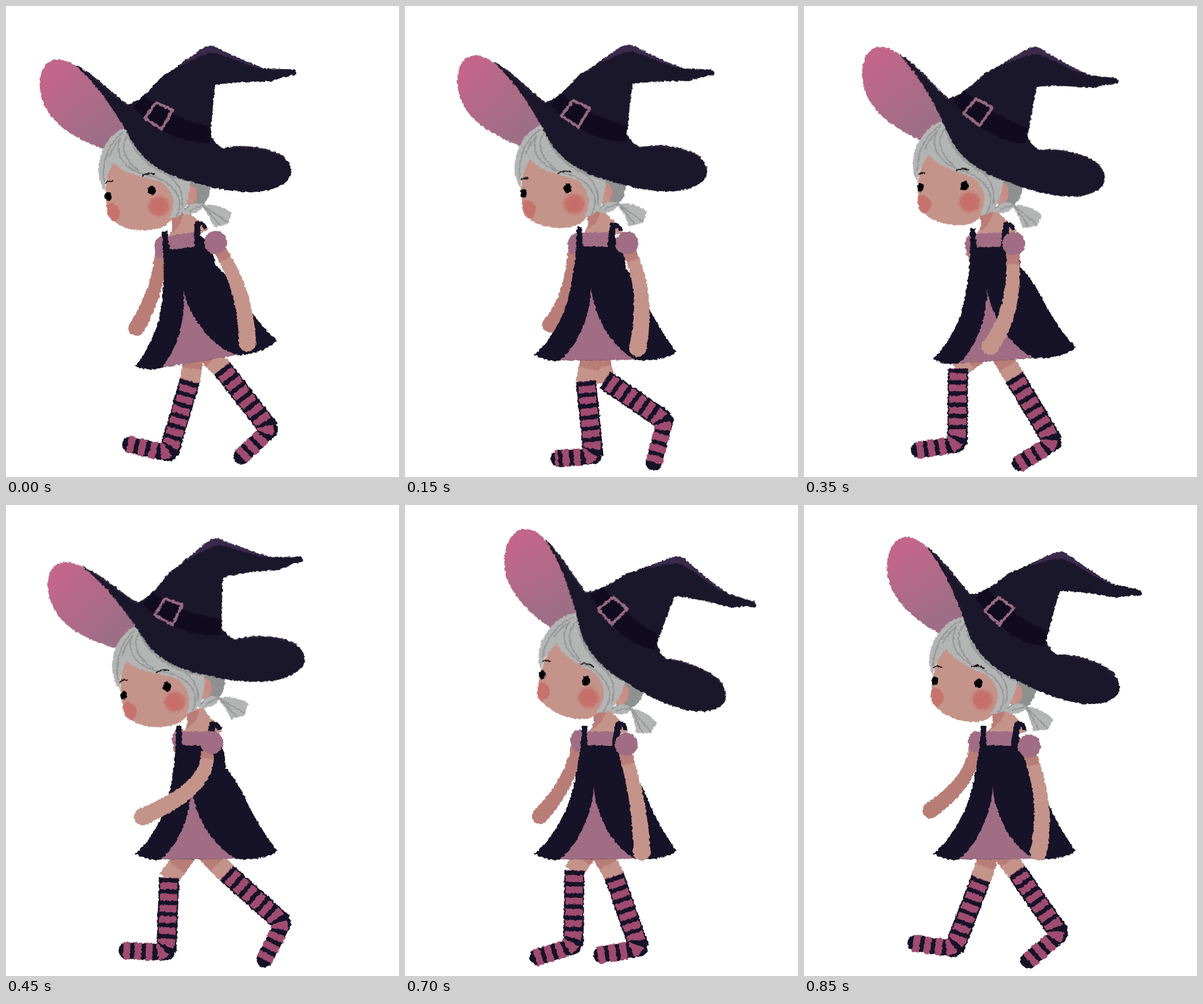
An HTML page that plays this animation: 684x819 px, repeating every 900 ms.

```html
<!DOCTYPE html>
<html lang="en">
<head>
<meta charset="utf-8">
<title>Walking witch</title>
<style>
  html, body { margin: 0; width: 100%; height: 100%; overflow: hidden; background: #fff; }
  svg { display: block; width: 100vw; height: 100vh; }
  .dark { fill: #161227; }
  .hat { fill: #1b172a; }
  .plum { fill: #a06d85; }
  .skin { fill: #c4948b; }
  .shade { fill: #b97d77; }
  .hair { fill: #b3b4b4; }
  .line { fill: none; stroke: #979797; stroke-width: 2.6; stroke-linecap: round; }
  .strap { fill: none; stroke: #161227; }
  .brow { fill: none; stroke: #1d1717; stroke-width: 2.4; stroke-linecap: round; }
  .leg path { fill: none; }
</style>
</head>
<body>
<svg viewBox="0 0 684 819">
  <defs>
    <filter id="rough" filterUnits="userSpaceOnUse" x="0" y="0" width="684" height="819" color-interpolation-filters="sRGB">
      <feTurbulence type="fractalNoise" baseFrequency=".2" numOctaves="2" seed="4"/>
      <feDisplacementMap in="SourceGraphic" scale="5" xChannelSelector="R" yChannelSelector="G"/>
    </filter>
    <linearGradient id="brim" gradientUnits="userSpaceOnUse" x1="80" y1="115" x2="172" y2="218">
      <stop offset="0" stop-color="#c2668a"/>
      <stop offset=".5" stop-color="#b06a87"/>
      <stop offset="1" stop-color="#9e6e87"/>
    </linearGradient>
    <radialGradient id="blush">
      <stop offset="0" stop-color="#c66b66"/>
      <stop offset=".65" stop-color="#c66f69" stop-opacity=".9"/>
      <stop offset="1" stop-color="#c4948b" stop-opacity="0"/>
    </radialGradient>
  </defs>

  <g filter="url(#rough)">
    <path id="farArm" class="shade"/>
    <ellipse id="farSleeve" class="plum" rx="14" ry="19"/>
    <g id="farLeg" class="leg"></g>
    <g id="nearLeg" class="leg"></g>

    <g id="body">
      <path class="skin" d="M306 396C320 388 322 372 316 358L348 352C350 368 371 374 380 394L358 400Z"/>
      <path class="shade" d="M317 389C322 378 318 365 314 358L340 358C337 372 329 383 317 389Z"/>
      <path class="plum" d="M303 394H362V422H303Z"/>
      <path class="dark" d="M299 386C299 440 289 500 275 535C261 565 245 590 225 606C238 615 256 619 272 616L398 615C430 619 458 613 473 601C455 580 441 556 427 530C414 500 398 470 384 456C385 436 380 412 364 402L353 419L308 417Z"/>
      <path class="plum" d="M324 490C328 532 355 592 402 615L270 616C302 588 322 540 324 490Z"/>
      <path class="strap" stroke-width="9" d="M304 384Q303 402 306 422"/>
      <path class="strap" stroke-width="11" d="M363 378Q359 400 357 424"/>
      <path class="strap" stroke-width="7" d="M359 380Q372 378 375 391"/>
    </g>

    <path id="nearArm" class="skin"/>
    <path id="armShade" class="shade"/>
    <ellipse id="nearSleeve" class="plum" rx="20" ry="20"/>

    <g id="head">
      <path fill="url(#brim)" d="M215 232C195 185 160 135 125 107C105 91 82 88 69 102C53 124 57 155 71 181C92 215 132 236 178 251Z"/>
      <path fill="#8f9090" d="M310 296L355 303C358 322 351 340 341 348L312 346Z"/>
      <path class="skin" d="M186 262C175 290 171 320 175 345C174 372 200 389 238 390C268 390 283 382 290 366L308 320L230 255Z"/>
      <ellipse cx="320" cy="328" rx="12" ry="18" fill="#c98c84"/>
      <path fill="#c4948b" d="M312 334L329 336Q324 347 310 346Z"/>
      <path class="hair" d="M306 359C314 346 330 338 345 346C338 359 324 365 307 361Z"/>
      <path class="hair" d="M340 347C360 342 381 350 393 359L386 379L362 385C356 370 349 358 340 347Z"/>
      <path class="line" d="M343 347L386 376M345 349L371 380M342 346C336 350 328 350 320 357M311 355L318 347"/>
      <ellipse cx="266" cy="348" rx="24" ry="23" fill="url(#blush)"/>
      <path fill="#c7716b" opacity=".9" d="M176 346C182 339 197 345 199 358C199 370 192 376 185 374C178 368 174 357 176 346Z"/>
      <path class="hair" d="M205 212C180 222 162 252 161 284C161 300 167 315 173 323C172 302 178 286 188 272C202 290 236 297 262 303C282 311 293 330 291 346C290 358 288 364 284 370C302 368 313 355 315 340C322 320 320 310 319 300L222 214Z"/>
      <path class="line" d="M204 220C180 236 167 268 170 303M198 232C188 262 208 284 244 294C275 299 297 316 302 338Q303 352 297 364M214 222C200 238 200 264 232 287M180 262C186 248 190 240 199 230M268 284C294 300 310 318 307 348"/>
      <path fill="#9b9c9c" d="M206 213L232 226L262 268L318 306C274 298 235 276 218 240Z"/>
      <ellipse cx="254" cy="321" rx="7" ry="8.5"/>
      <ellipse cx="178" cy="331" rx="6" ry="7.5"/>
      <path class="brow" d="M238 295Q247 289 259 293M173 308Q178 303 185 305"/>
      <path class="hat" d="M120 102C150 116 186 152 212 172L356 226C364 238 370 243 378 247C400 243 430 243 455 250C486 259 500 276 496 293C490 315 450 326 415 323C380 322 345 312 318 304C275 293 240 270 222 240C200 200 170 152 140 122Z"/>
      <path class="hat" d="M203 174C232 170 254 142 272 122C296 110 320 85 350 71C357 67 365 71 372 76C400 88 430 102 450 109L495 110C504 110 508 117 503 120C490 121 475 126 463 131C430 131 390 132 364 138C360 170 358 200 355 237L270 225Z"/>
      <path fill="#3a294b" d="M303 104C320 90 340 71 355 69C372 72 400 92 454 109L440 108C410 99 380 85 359 81C340 84 320 97 303 104Z"/>
      <path fill="none" stroke="#2b2138" stroke-width="3" d="M138 114C165 134 190 158 212 173M390 246C430 242 466 251 485 264"/>
      <path fill="#100b1e" d="M239 155C272 184 318 202 356 210L354 237C310 241 257 214 222 176Z"/>
      <path fill="#100b1e" stroke="#986983" stroke-width="5" stroke-linejoin="round" d="M261 168L290 181L271 214L241 195Z"/>
    </g>
  </g>
</svg>

<script>
const LOOP = 900, STEP = 50;

// Each row: time, then values.
const headKeys = [ // eye x, eye y, turn
  [0, 254, 321, 0], [150, 283, 317, 1], [250, 291, 312, 9], [350, 279, 313, 5.2],
  [450, 280, 316, -3.8], [550, 262, 320, -14.3], [600, 261, 320, -14.8],
  [700, 315, 306, 15.4], [750, 343, 306, 28], [800, 328, 307, 20], [850, 304, 310, 10.5]
];
const bodyKeys = [ // shift of the shoulders, tilt of the hem
  [0, -28, -.157], [150, 0, 0], [350, -10, -.06], [450, -3, 0], [550, -18, -.07],
  [600, -20, -.085], [700, 9, 0], [750, 20, 0], [850, 9, 0]
];
const nearArmKeys = [ // sleeve, shoulder x, elbow, hand
  [0, 365, 411, 372, 407, 500, 420, 586], [150, 386, 412, 390, 411, 505, 405, 595],
  [350, 365, 413, 363, 357, 520, 324, 592], [450, 358, 413, 350, 327, 487, 238, 542],
  [600, 346, 413, 341, 328, 515, 291, 590], [700, 385, 416, 383, 404, 520, 412, 603],
  [850, 392, 419, 393, 413, 520, 408, 603]
];
const farArmKeys = [ // sleeve, elbow, hand
  [0, 272, 420, 257, 495, 227, 560], [150, 297, 415, 281, 500, 253, 554],
  [350, 294, 415, 320, 490, 345, 552], [450, 303, 408, 325, 490, 360, 552],
  [600, 280, 413, 280, 495, 260, 554], [700, 302, 410, 279, 480, 235, 541],
  [850, 300, 412, 276, 478, 220, 531]
];
const nearLegKeys = [ // knee, heel, toe
  [0, 320, 652, 283, 778, 216, 763], [150, 315, 652, 328, 783, 268, 787],
  [350, 366, 645, 434, 759, 376, 795], [450, 384, 640, 482, 727, 450, 790],
  [600, 325, 625, 413, 722, 385, 788], [700, 295, 635, 293, 767, 231, 786],
  [850, 308, 650, 261, 772, 194, 762]
];
const farLegKeys = [
  [0, 376, 630, 459, 737, 410, 783], [150, 348, 650, 453, 722, 433, 794],
  [350, 268, 630, 267, 762, 200, 772], [450, 284, 648, 279, 778, 210, 775],
  [600, 326, 640, 328, 777, 261, 787], [700, 364, 645, 408, 771, 342, 782],
  [850, 370, 637, 445, 746, 391, 792]
];

const $ = id => document.getElementById(id);
const set = (el, attrs) => { for (const k in attrs) el.setAttribute(k, attrs[k]); };

// Smooth cyclic interpolation through the rows.
function sample(keys, t) {
  const n = keys.length;
  const row = i => keys[(i + n) % n];
  const when = i => row(i)[0] + Math.floor(i / n) * LOOP;
  let i = n - 1;
  while (keys[i][0] > t) i--;
  const span = when(i + 1) - when(i), u = (t - when(i)) / span;
  const [a, b, c, d] = [-1, 0, 1, 2].map(k => row(i + k));
  return b.slice(1).map((p, k) => {
    const q = c[k + 1];
    const m = (q - a[k + 1]) / (when(i + 1) - when(i - 1)) * span;
    const w = (d[k + 1] - p) / (when(i + 2) - when(i)) * span;
    return p + u * (m + u * (3 * (q - p) - 2 * m - w + u * (2 * (p - q) + m + w)));
  });
}

// Tapered limb bending through its middle joint.
function limb(a, mid, c, r0, r1, end = 1) {
  const ctrl = mid.map((v, k) => 2 * v - (a[k] + c[k]) / 2);
  const left = [], right = [];
  for (let i = 0; i <= 14; i++) {
    const t = i / 14 * end, s = 1 - t, r = r0 + (r1 - r0) * t;
    const [x, y] = [0, 1].map(k => s * s * a[k] + 2 * s * t * ctrl[k] + t * t * c[k]);
    const [dx, dy] = [0, 1].map(k => s * (ctrl[k] - a[k]) + t * (c[k] - ctrl[k]));
    const f = r / Math.hypot(dx, dy);
    left.push([x - dy * f, y + dx * f]);
    right.unshift([x + dy * f, y - dx * f]);
  }
  const cap = end === 1 ? `A${r1} ${r1} 0 0 0 ${right[0]}` : '';
  return `M${left.join('L')}${cap}L${right.join('L')}Z`;
}

function toward(a, b, dist) {
  const f = dist / Math.hypot(b[0] - a[0], b[1] - a[1]);
  return [a[0] + (b[0] - a[0]) * f, a[1] + (b[1] - a[1]) * f];
}

function makeLeg(group) {
  const add = attrs => {
    const p = document.createElementNS(group.namespaceURI, 'path');
    set(p, attrs);
    return group.appendChild(p);
  };
  const thigh = add({ stroke: '#b97d77', 'stroke-width': 35 });
  const lit = add({ stroke: '#c4948b', 'stroke-width': 35 });
  const shin = add({ stroke: '#161227', 'stroke-width': 35 });
  const foot = add({ stroke: '#161227', 'stroke-width': 28, 'stroke-linecap': 'round' });
  const stripes = add({ stroke: '#9f4c70', 'stroke-width': 30, 'stroke-dasharray': '12 7.5', 'stroke-dashoffset': 11 });
  const hip = [330, 585];
  return ([kx, ky, hx, hy, tx, ty]) => {
    const knee = [kx, ky], heel = [hx, hy], toe = [tx, ty];
    set(thigh, { d: `M${hip}L${toward(knee, hip, -4)}` });
    set(lit, { d: `M${toward(knee, hip, 22)}L${toward(knee, hip, -4)}` });
    set(shin, { d: `M${knee}L${heel}` });
    set(foot, { d: `M${heel}L${toe}` });
    set(stripes, { d: `M${knee}L${toward(heel, knee, 24)}Q${heel} ${toward(heel, toe, 22)}L${toward(toe, heel, -7)}` });
  };
}

const poseNear = makeLeg($('nearLeg')), poseFar = makeLeg($('farLeg'));

function pose(t) {
  const [x, y, turn] = sample(headKeys, t);
  set($('head'), { transform: `translate(${x} ${y}) rotate(${turn}) translate(-254 -321)` });

  const [shift, tilt] = sample(bodyKeys, t), skew = -shift / 222;
  set($('body'), { transform: `matrix(1 ${tilt} ${skew} 1 ${-610 * skew} ${-350 * tilt})` });

  const [nx, ny, sx, ex, ey, hx, hy] = sample(nearArmKeys, t);
  const near = [[sx, ny + 14], [ex, ey], [hx, hy]];
  set($('nearArm'), { d: limb(...near, 11, 15) });
  set($('armShade'), { d: limb(...near, 11, 15, .11) });
  set($('nearSleeve'), { cx: nx, cy: ny });

  const [fx, fy, gx, gy, px, py] = sample(farArmKeys, t);
  set($('farArm'), { d: limb([fx - 3, fy + 10], [gx, gy], [px, py], 10, 14) });
  set($('farSleeve'), { cx: fx, cy: fy });

  poseNear(sample(nearLegKeys, t));
  poseFar(sample(farLegKeys, t));
}

const start = performance.now();
let shown = -1;
function tick() {
  const step = Math.floor((performance.now() - start) % LOOP / STEP);
  if (step !== shown) pose((shown = step) * STEP);
  requestAnimationFrame(tick);
}
tick();
</script>
</body>
</html>
```
